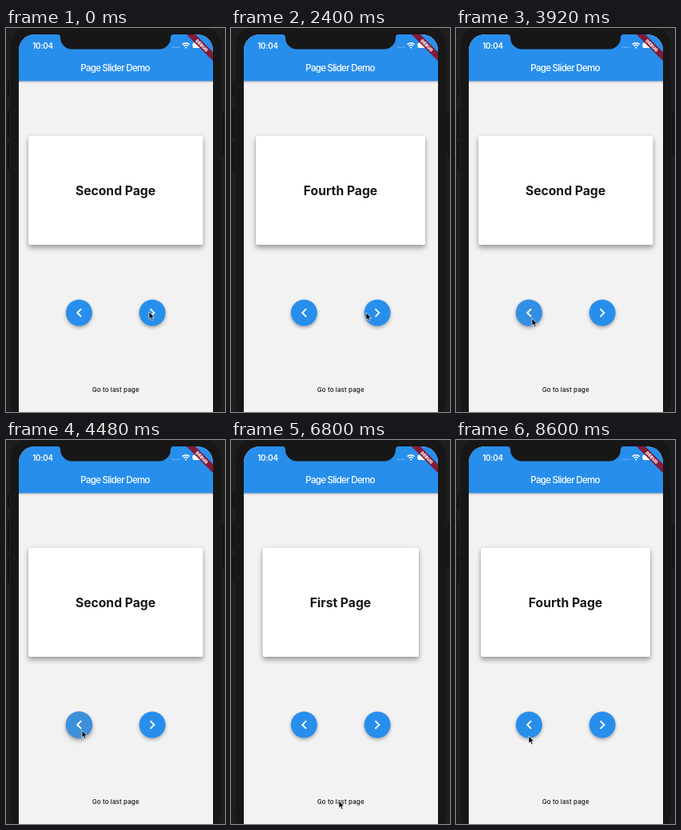
Animation, 274 px wide and 480 px high, one loop 8.68 s. Source, as an HTML page:

```html
<!DOCTYPE html>
<html lang="en">
<head>
<meta charset="utf-8">
<title>Page Slider Demo</title>
<style>
  html, body { margin: 0; width: 100%; height: 100%; overflow: hidden; background: #1d1d1d; }
  svg { display: block; width: 100vw; height: 100vh; }
  text { font-family: Inter, Roboto, sans-serif; text-anchor: middle; fill: #161616; }

  .body { fill: #171717; }
  .bar { fill: #288eec; filter: drop-shadow(0 1.2px 1.2px rgba(0, 0, 0, .3)); }
  .title { font-size: 11.5px; font-weight: 500; letter-spacing: -.7px; fill: #fff; }
  .clock { font-size: 9.8px; font-weight: 600; letter-spacing: -.2px; fill: #fff; }
  .debug { font-size: 5.6px; font-weight: 900; fill: #fff; }
  .last { font-size: 8px; font-weight: 500; letter-spacing: .1px; }

  .page rect {
    fill: #fff;
    filter: drop-shadow(.7px 4px 3px rgba(0, 0, 0, .3)) drop-shadow(0 0 1px rgba(0, 0, 0, .18));
  }
  .page text { font-size: 15.7px; font-weight: 700; }

  .button { fill: #288eec; filter: drop-shadow(.3px 2.7px 2.2px rgba(0, 0, 0, .32)); }
  .press { opacity: 0; }
  .press .lift { fill: #288eec; filter: drop-shadow(.3px 4.5px 3.5px rgba(0, 0, 0, .14)); }
  .press .ink { fill: rgba(150, 150, 150, .2); }
  .icon { fill: none; stroke: #fff; stroke-width: 1.9; }

  .page, .press, .cursor { animation: 8680ms ease-in-out infinite; }
  .first { animation-name: first; }
  .second { animation-name: second; }
  .third { animation-name: third; }
  .fourth { animation-name: fourth; }
  .press { animation-timing-function: linear; }
  .press.back { animation-name: press-back; }
  .press.next { animation-name: press-next; }
  .cursor { animation-name: cursor; }

  @keyframes first {
    0%, 51.73% { transform: translateX(-243px); }
    53.92%, 79.95% { transform: none; }
    82.72%, 100% { transform: translateX(-243px); }
  }
  @keyframes second {
    0%, 3.69% { transform: none; }
    6.45%, 42.63% { transform: translateX(-243px); }
    45.16%, 51.73% { transform: none; }
    53.92%, 100% { transform: translateX(243px); }
  }
  @keyframes third {
    0%, 3.69% { transform: translateX(243px); }
    6.45%, 17.51% { transform: none; }
    20.28%, 35.14% { transform: translateX(-243px); }
    37.9%, 42.63% { transform: none; }
    45.16%, 100% { transform: translateX(243px); }
  }
  @keyframes fourth {
    0%, 17.51% { transform: translateX(243px); }
    20.28%, 35.14% { transform: none; }
    37.9%, 79.95% { transform: translateX(243px); }
    82.72%, 100% { transform: none; }
  }
  @keyframes press-next {
    0%, .9% { opacity: 0; }
    2.4%, 5% { opacity: 1; }
    9.5%, 14.7% { opacity: 0; }
    16.1%, 19% { opacity: 1; }
    23.5%, 100% { opacity: 0; }
  }
  @keyframes press-back {
    0%, 33.1% { opacity: 0; }
    34.5%, 35.5% { opacity: 1; }
    38%, 40.5% { opacity: 0; }
    42%, 43.5% { opacity: 1; }
    47%, 49.2% { opacity: 0; }
    50.7%, 52% { opacity: 1; }
    54%, 56.6% { opacity: 0; }
    58%, 59% { opacity: 1; }
    60.8%, 100% { opacity: 0; }
  }
  @keyframes cursor {
    0%, 26.5% { transform: translate(179px, 354.7px); }
    31.3%, 64.1% { transform: translate(95px, 363px); }
    65.9%, 67.7% { transform: translate(95px, 365.5px); }
    77.4%, 93.1% { transform: translate(135px, 451px); }
    99%, 100% { transform: translate(91px, 370px); }
  }
</style>
</head>
<body>
<svg viewBox="0 0 274 480">
  <defs>
    <clipPath id="screen"><path d="M16 480V28a20 20 0 0 1 20-20H239a20 20 0 0 1 20 20V480z"/></clipPath>
  </defs>

  <!-- Phone body and side keys -->
  <g fill="#111">
    <rect x="2" y="67" width="4" height="19" rx="1"/>
    <rect x="2" y="102" width="4" height="36" rx="1"/>
    <rect x="2" y="143" width="4" height="35" rx="1"/>
    <rect x="269" y="104" width="3.500" height="56" rx="1"/>
  </g>
  <rect class="body" x="4.5" y="-5" width="265.5" height="500" rx="28" stroke="#222"/>

  <g clip-path="url(#screen)">
    <rect x="16" y="7" width="243" height="473" fill="#f3f2f3"/>

    <g class="page first">
      <rect x="39.5" y="134.5" width="195.5" height="136.5" rx="2.5"/>
      <text x="137" y="209.2">First Page</text>
    </g>
    <g class="page second">
      <rect x="28" y="134.5" width="218.5" height="136.5" rx="2.5"/>
      <text x="137" y="209.2">Second Page</text>
    </g>
    <g class="page third">
      <rect x="37" y="134.5" width="200.5" height="136.5" rx="2.5"/>
      <text x="137.3" y="209.2">Third Page</text>
    </g>
    <g class="page fourth">
      <rect x="31" y="134.5" width="212" height="136.5" rx="2.5"/>
      <text x="137" y="209.2">Fourth Page</text>
    </g>

    <circle class="button" cx="91.4" cy="356" r="16.5"/>
    <g class="press back">
      <circle class="lift" cx="91.4" cy="356" r="16.5"/>
      <circle class="ink" cx="91.4" cy="356" r="16.5"/>
    </g>
    <path class="icon" d="M94.1 351.1l-4.900 4.900 4.900 4.900"/>

    <circle class="button" cx="183.1" cy="356" r="16.5"/>
    <g class="press next">
      <circle class="lift" cx="183.1" cy="356" r="16.5"/>
      <circle class="ink" cx="183.1" cy="356" r="16.5"/>
    </g>
    <path class="icon" d="M180.500 351.1l4.900 4.900-4.900 4.900"/>

    <text class="last" x="137.2" y="455.2">Go to last page</text>

    <rect class="bar" x="10" y="0" width="256" height="66.3"/>
    <text class="title" x="136.5" y="53.8">Page Slider Demo</text>

    <!-- Status bar -->
    <text class="clock" x="46" y="25.7">10:04</text>
    <g fill="#fff" opacity=".5">
      <circle cx="208.5" cy="24.3" r=".8"/><circle cx="211.2" cy="24.3" r=".8"/>
      <circle cx="213.9" cy="24.3" r=".8"/><circle cx="216.6" cy="24.3" r=".8"/>
    </g>
    <g fill="none" stroke="#fff" stroke-width="1.5">
      <path d="M220.6 20.6a6.4 6.4 0 0 1 9 0M222.4 22.6a3.9 3.9 0 0 1 5.4 0"/>
      <path d="M225.1 23.2l1.3 1.3-1.3 1.3-1.3-1.3z" fill="#fff" stroke="none"/>
    </g>
    <rect x="233.4" y="18.4" width="12.4" height="6.6" rx="1.9" fill="#fff"/>

    <g transform="translate(259 8) rotate(45)">
      <rect x="-26" y="15.700" width="52" height="7.8" fill="#811a38"/>
      <text class="debug" x="0" y="21.700">DEBUG</text>
    </g>
  </g>

  <path class="body" d="M64 7h146v1q-4 0-4 4a14.500 14.500 0 0 1-14.500 14.500h-109a14.500 14.500 0 0 1-14.500-14.500q0-4-4-4z"/>

  <path class="cursor" d="M0 0v9.200l2.100-1.900 1.500 3.400 1.600-.7-1.500-3.300h2.900z"
        fill="#000" stroke="#fff" stroke-width=".7" stroke-linejoin="round"/>
</svg>
</body>
</html>
```
